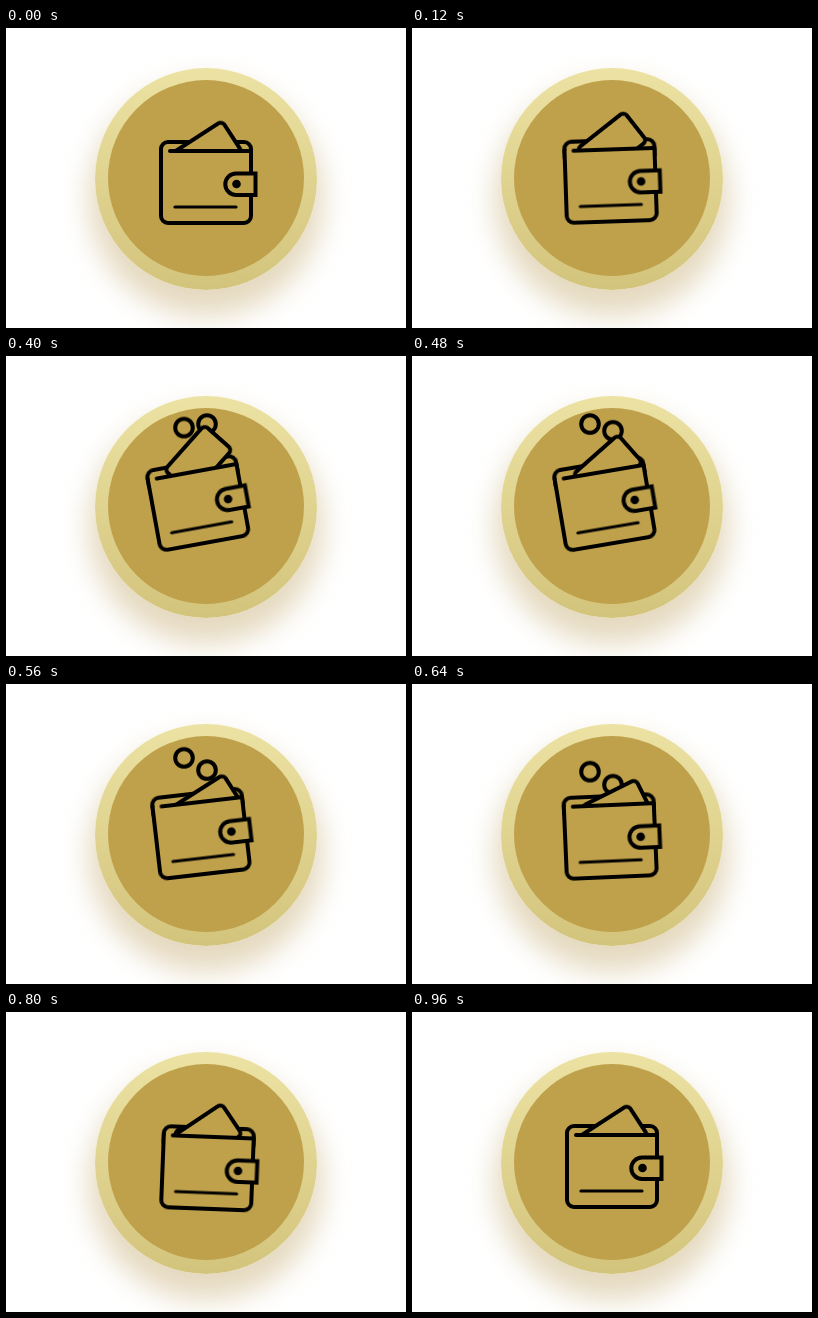
An HTML page for the animation above (1000 ms loop, 400 by 300 pixels).

```html
<!DOCTYPE html>
<html lang="en">
<head>
<meta charset="utf-8">
<title>Wallet</title>
<style>
  :root { --gold: #bfa14b; }
  html, body { margin: 0; width: 100%; height: 100%; overflow: hidden; background: #fff; }
  .stage { position: relative; width: 400px; height: 300px; overflow: hidden; }

  .badge, .face { position: absolute; border-radius: 50%; }
  .badge {
    left: 89px; top: 40px; width: 222px; height: 222px;
    background: linear-gradient(#ece2a3, #d3c47c);
    box-shadow: 0 20px 28px 6px rgba(190, 160, 95, .4);
  }
  .face { left: 102px; top: 52px; width: 196px; height: 196px; background: var(--gold); }

  svg { position: absolute; left: 0; top: 0; }
  .ink { fill: none; stroke: #000; stroke-width: 4; stroke-linejoin: round; stroke-linecap: round; }
  .solid { fill: var(--gold); }

  /* Default easing is a sine in-out; keyframes override it where needed */
  .tilt, .card, .coin { animation: 1s cubic-bezier(.37, 0, .63, 1) infinite; }
  .tilt { transform-origin: 155px 196px; animation-name: tilt; }
  .card { transform-origin: 0 0; animation-name: card; }
  .left { animation-name: left; }
  .right { animation-name: right; }

  @keyframes tilt {
    0%   { transform: rotate(0deg); }
    42%  { transform: rotate(-10.4deg); }
    80%  { transform: rotate(2.2deg); }
    96%, 100% { transform: rotate(0deg); }
  }
  /* Positions are those of the card's top corner */
  @keyframes card {
    0%   { transform: translate(216px, 93px) rotate(-33deg); }
    24%  { transform: translate(215.6px, 79px) rotate(-39.5deg); animation-timing-function: linear; }
    40%  { transform: translate(220.5px, 79px) rotate(-38deg); }
    56%  { transform: translate(229px, 98.5px) rotate(-26deg); animation-timing-function: linear; }
    64%  { transform: translate(228px, 98.5px) rotate(-24deg); }
    80%  { transform: translate(211.5px, 89.5px) rotate(-36deg); }
    96%, 100% { transform: translate(216px, 93px) rotate(-33deg); }
  }
  @keyframes left {
    0%   { transform: translate(178px, 138px); animation-timing-function: cubic-bezier(.4, .13, .6, 1); }
    48%  { transform: translate(178px, 68px); animation-timing-function: cubic-bezier(.4, .05, .6, .8); }
    90%, 100% { transform: translate(178px, 138px); }
  }
  @keyframes right {
    0%   { transform: translate(201px, 140px); animation-timing-function: cubic-bezier(.4, .25, .6, 1); }
    38%  { transform: translate(201px, 67px); animation-timing-function: cubic-bezier(.4, .12, .6, .77); }
    90%, 100% { transform: translate(201px, 140px); }
  }
</style>
</head>
<body>
<div class="stage">
  <div class="badge"></div>
  <div class="face"></div>
  <svg width="400" height="300" viewBox="0 0 400 300">
    <g class="ink">
      <!-- back edge -->
      <g class="tilt">
        <path d="M155 130V121a7 7 0 0 1 7-7H238a7 7 0 0 1 7 7V130"/>
      </g>

      <circle class="coin left" r="8.8"/>
      <circle class="coin right" r="8.8"/>

      <g class="tilt">
        <rect class="card solid" x="-60" y="0" width="60" height="37" rx="4.5"/>
        <!-- front pocket -->
        <path class="solid" stroke="none" d="M155 123H245V188a7 7 0 0 1-7 7H162a7 7 0 0 1-7-7Z"/>
        <path d="M155 122V188a7 7 0 0 0 7 7H238a7 7 0 0 0 7-7V123H164"/>
        <path d="M169 179H230" stroke-width="3.2"/>
        <!-- clasp -->
        <path class="solid" stroke-linejoin="miter" d="M249.5 145.5H230a10.7 10.7 0 0 0 0 21.4H249.5Z"/>
        <circle cx="230.5" cy="156" r="4.3" fill="#000" stroke="none"/>
      </g>
    </g>
  </svg>
</div>
</body>
</html>
```
